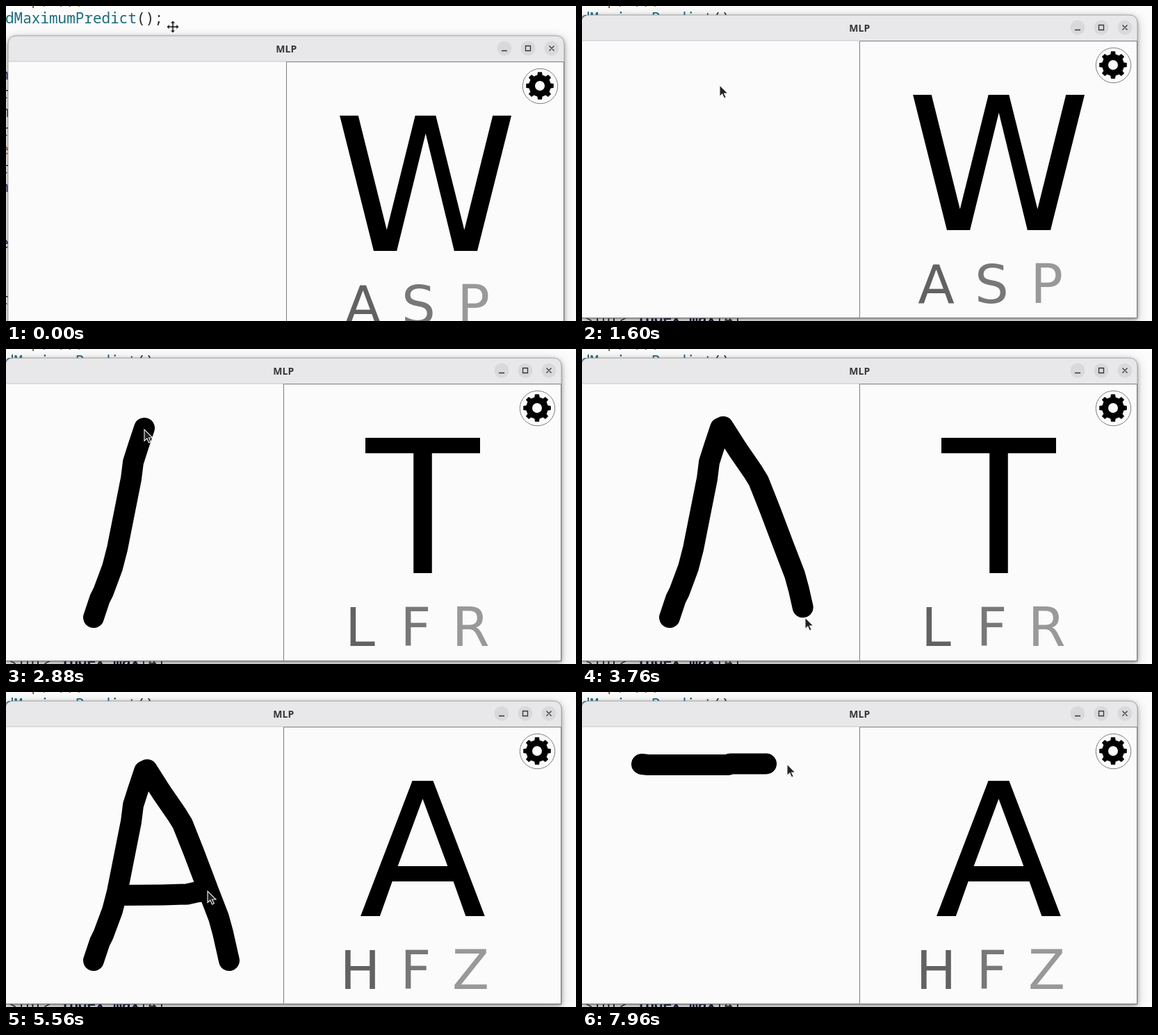
Recreate the animation shown at these times as an HTML page. Size 820 by 454 pixels, loop 8 s.

```html
<!DOCTYPE html>
<html lang="en">
<head>
<meta charset="utf-8">
<title>MLP</title>
<style>
  html, body { margin: 0; width: 100%; height: 100%; overflow: hidden; background: #fcfcfc; }
  svg { display: block; width: 820px; height: 454px; }
  .code { font: 21px "Noto Sans Mono", monospace; fill: #26262c; white-space: pre; }
  .glyph { font-family: "DejaVu Sans", sans-serif; text-anchor: middle; }
  .title { font: bold 14px "Open Sans", sans-serif; text-anchor: middle; fill: #363636; }
  .frame { fill: #fbfbfb; filter: drop-shadow(0 2px 3px #00000055) drop-shadow(0 3px 8px #00000033); }
  .ink { fill: none; stroke: #000; stroke-width: 30; stroke-linecap: round; stroke-linejoin: round; }
  .line { fill: none; stroke: #7c7c7c; }
  .icon { fill: none; stroke: #363636; stroke-width: 1.3; }
</style>
</head>
<body>
<svg viewBox="0 0 820 454">
  <rect width="820" height="454" fill="#fcfcfc"/>
  <g id="code" class="code">
    <text x="24" y="-2" fill="#7a5c20">op, ));</text>
    <text x="-1" y="25"><tspan fill="#1c6c80">dMaximumPredict</tspan>();</text>
    <text x="3" y="457">&lt;int&gt;  <tspan font-weight="bold" fill="#1c2444">index_max</tspan>[4]</text>
  </g>

  <g id="window">
    <path class="frame" d="M-1 450V25q0-12 12-12H787q12 0 12 12V450z"/>
    <path fill="#e8e7e9" d="M-1 50V25q0-12 12-12H787q12 0 12 12V50z"/>
    <path class="line" opacity=".6" d="M-1 450V25q0-12 12-12H787q12 0 12 12V450z"/>
    <path class="line" opacity=".35" d="M-1 50H400"/>
    <path class="line" d="M399.5 450V50.5H798.5V449.5H-1"/>
    <text class="title" x="399.3" y="36.7">MLP</text>
    <g fill="#d9d8da">
      <circle cx="713" cy="31" r="10.5"/><circle cx="747" cy="31" r="10.5"/><circle cx="781" cy="31" r="10.5"/>
    </g>
    <path class="icon" d="M709 34.5h8M743.5 27.5h7v7h-7zM777.5 27.5l7 7m0-7l-7 7"/>
    <circle class="line" cx="764.5" cy="85.5" r="25.2"/>
    <path id="gear" fill-rule="evenodd" transform="translate(764 85)"/>
    <text class="glyph" id="best" x="599.5" y="323" font-size="267.5"></text>
    <g id="others" class="glyph"></g>
    <g id="strokes"></g>
  </g>

  <path id="arrow" d="M0 0V16.5L3.8 13L6.5 19L9.3 17.7L6.6 12H12z" fill="#222" stroke="#f4f4f4" stroke-width="1.1"/>
  <path id="mover" d="M0-9l3.6 4H1.2V-1.2H5V-3.6L9 0 5 3.6V1.2H1.2V5H3.6L0 9-3.6 5H-1.2V1.2H-5V3.6L-9 0-5-3.6V-1.2H-1.2V-5H-3.6z" fill="#222" stroke="#f4f4f4" stroke-width=".8"/>
</svg>

<script>
const LOOP = 8000, STEP = 40, CLEAR = 6920;
const $ = id => document.getElementById(id);
const clamp = v => Math.max(0, Math.min(1, v));
const ease = v => (1 - Math.cos(Math.PI * clamp(v))) / 2;

function add(parent, tag, attrs, text = '') {
  const node = document.createElementNS('http://www.w3.org/2000/svg', tag);
  for (const key in attrs) node.setAttribute(key, attrs[key]);
  node.textContent = text;
  return parent.appendChild(node);
}

// Ends of the code lines that peek out left of the window
[...'nrmrern  e  r'].forEach((char, i) => add($('code'), 'text', {
  x: 4, y: 106 + 27 * i, 'text-anchor': 'end', fill: char === 'e' && i < 6 ? '#b0622a' : '#24305c'
}, char));

function gearPath() {
  const points = [];
  for (let tooth = 0; tooth < 8; tooth++) {
    for (const [radius, turn] of [[16, -.29], [20, -.19], [20, .19], [16, .29]]) {
      const angle = (tooth + turn) * Math.PI / 4;
      points.push([radius * Math.sin(angle), -radius * Math.cos(angle)].map(v => v.toFixed(2)));
    }
  }
  return `M${points.join('L')}zM7 0A7 7 0 1 0-7 0A7 7 0 1 0 7 0z`;
}
$('gear').setAttribute('d', gearPath());

const others = [[509.5, 77, '#626262'], [589.5, 77, '#787878'], [668.5, 78, '#999']].map(
  ([x, size, fill]) => add($('others'), 'text', { x, y: 428, 'font-size': size, fill }));

const predictions = [[0, 'WASP'], [2360, 'TLFR'], [3840, 'ZBAG'], [5520, 'AHFZ']];

const strokes = [
  [1680, 2280, CLEAR, 'M199 114L190 141L183 163L180 187L160 288L153 315L140 350L135 360L126 387'],
  [2960, 3760, CLEAR, 'M203 112L224 145L246 177L254 190L271 233L291 286L306 325L312 347L321 387'],
  [4760, 5440, CLEAR, 'M160 293L225 292.5L260 291.5L276 288L290 287'],
  [7680, 7960, LOOP, 'M86 104L95 105L211 105L213 103.5L295 103.5']
].map(([start, end, gone, d]) => {
  const path = add($('strokes'), 'path', { class: 'ink', pathLength: 1, d });
  return { start, end, gone, path, length: path.getTotalLength() };
});

// Pointer rests: time, x, y
const pointer = [
  [0, 240, 30], [240, 240, 30], [520, 269, 36], [800, 269, 36], [1480, 197, 113], [1680, 199, 114],
  [2280, 126, 387], [2400, 126, 387], [2840, 197, 117], [2960, 203, 112],
  [3760, 321, 387], [3920, 321, 387], [4640, 159, 293], [4760, 160, 293],
  [5440, 290, 287], [5720, 290, 287], [6320, 257, 213], [6880, 257, 213], [7560, 86, 104], [7680, 86, 104], [LOOP, 295, 103]
];

function pointerAt(t) {
  const active = strokes.find(s => t >= s.start && t <= s.end);
  if (active) {
    const p = active.path.getPointAtLength(active.length * (t - active.start) / (active.end - active.start));
    return [p.x, p.y];
  }
  const next = Math.max(1, pointer.findIndex(k => k[0] > t));
  const [t0, x0, y0] = pointer[next - 1], [t1, x1, y1] = pointer[next];
  const part = ease((t - t0) / (t1 - t0));
  return [x0 + (x1 - x0) * part, y0 + (y1 - y0) * part];
}

function render(t) {
  const lag = 1 - ease(t / 160);
  $('window').setAttribute('transform', `translate(${Math.round(4 * lag)} ${Math.round(30 * lag)})`);

  const letters = predictions.filter(([time]) => time <= t).pop()[1];
  $('best').textContent = letters[0];
  others.forEach((node, i) => node.textContent = letters[i + 1]);

  // Ink trails the pointer by one step
  for (const { start, end, gone, path } of strokes) {
    const drawn = clamp((t - STEP - start) / (end - start));
    path.style.visibility = t >= start + STEP && t < gone ? 'visible' : 'hidden';
    path.setAttribute('stroke-dasharray', `${Math.max(drawn, .001)} 2`);
  }

  const place = `translate(${pointerAt(t).map(v => Math.round(v)).join(' ')})`;
  const dragging = t < 280;
  for (const [id, shown] of [['mover', dragging], ['arrow', !dragging]]) {
    $(id).setAttribute('transform', place);
    $(id).style.visibility = shown ? 'visible' : 'hidden';
  }
}

const origin = performance.now();
function tick() {
  const t = (performance.now() - origin) % LOOP;
  render(Math.floor(t / STEP) * STEP);
  requestAnimationFrame(tick);
}
tick();
</script>
</body>
</html>
```
